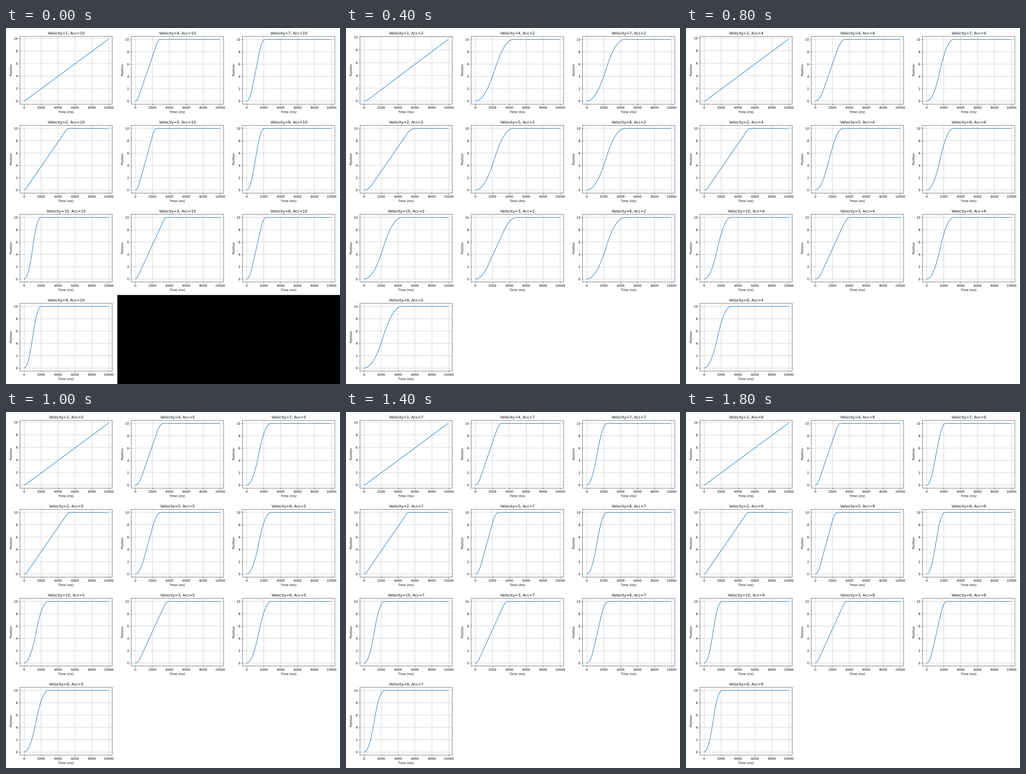
A matplotlib script for the animation above (2000 ms loop, 725 px wide and 773 px high).

```python
import matplotlib.pyplot as plt
import numpy as np
from matplotlib.animation import FuncAnimation
from matplotlib.patches import Rectangle
from matplotlib.patheffects import Normal

W, H, DPI = 725, 773, 64
SHEET_W, SHEET_H = 1500, 1600      # design grid: 3 x 4 cells of 500 x 400 units
CELL_W, CELL_H = 500, 400
LEFT, LEFT_NARROW, RIGHT, TOP, BOTTOM = 62.5, 53.5, 477, 37.5, 342
K = W / SHEET_W * 100 / DPI        # points on the design grid -> points here

GOAL = 10
VELOCITIES = [1, 4, 7, 2, 5, 8, 10, 3, 6, 9]
ACCELERATIONS = [10, *range(1, 10)]
TIME_MS = np.arange(0, 10000, 100)

plt.rcParams.update({
    "font.family": "DejaVu Sans",
    "font.size": 10 * K,
    "lines.linewidth": 1.5 * K,
    "axes.linewidth": 0.8 * K,
    "grid.linewidth": 0.8 * K,
    "axes.labelpad": 4 * K,
    "axes.titlepad": 6 * K,
    "path.snap": False,
    "path.effects": [Normal()],    # draws text as outlines, placed between pixels
    "text.hinting": "no_hinting",
})
for tick in ("xtick", "ytick"):
    plt.rcParams.update({
        f"{tick}.major.size": 3.5 * K,
        f"{tick}.major.pad": 3.5 * K,
        f"{tick}.major.width": 0.8 * K,
    })


def position(v_max, acc):
    """Trapezoidal motion from 0 to GOAL; triangular if v_max is out of reach."""
    t = TIME_MS / 1000
    peak = min(v_max, np.sqrt(GOAL * acc))
    ramp = peak / acc
    total = GOAL / peak + ramp
    rest = np.maximum(total - t, 0)
    speeding = acc * t**2 / 2
    cruising = peak * (t - ramp / 2)
    braking = GOAL - acc * rest**2 / 2
    return np.where(t < ramp, speeding,
                    np.where(t < total - ramp, cruising, braking))


def cell_rect(index, left):
    row, col = divmod(index, 3)
    return [(col * CELL_W + left) / SHEET_W,
            1 - (row * CELL_H + BOTTOM) / SHEET_H,
            (RIGHT - left) / SHEET_W,
            (BOTTOM - TOP) / SHEET_H]


fig = plt.figure(figsize=(W / DPI, H / DPI), dpi=DPI, facecolor="white")
blank = fig.add_artist(Rectangle((1 / 3, 0), 2 / 3, 1 / 4, color="black", lw=0,
                                 transform=fig.transFigure))

panels = []
for i in range(len(VELOCITIES)):
    ax = fig.add_axes(cell_rect(i, LEFT))
    ax.set_xlabel("Time (ms)")
    ax.set_ylabel("Position")
    ax.grid(True)
    line, = ax.plot(TIME_MS, np.zeros(len(TIME_MS)))
    panels.append((ax, line))


def update(frame):
    acc = ACCELERATIONS[frame]
    blank.set_visible(frame == 0)
    for i, (v, (ax, line)) in enumerate(zip(VELOCITIES, panels)):
        pos = position(v, acc)
        line.set_ydata(pos)
        ax.relim()
        ax.autoscale_view()
        ax.set_title(f"Velocity={v}, Acc={acc}")
        # one-digit tick labels leave room for a wider plot
        two_digits = ax.get_ylim()[1] >= 10
        ax.set_position(cell_rect(i, LEFT if two_digits else LEFT_NARROW))
    return []


anim = FuncAnimation(fig, update, frames=len(ACCELERATIONS), init_func=lambda: [],
                     interval=200, repeat=True, repeat_delay=0, blit=False)
plt.show()
```
